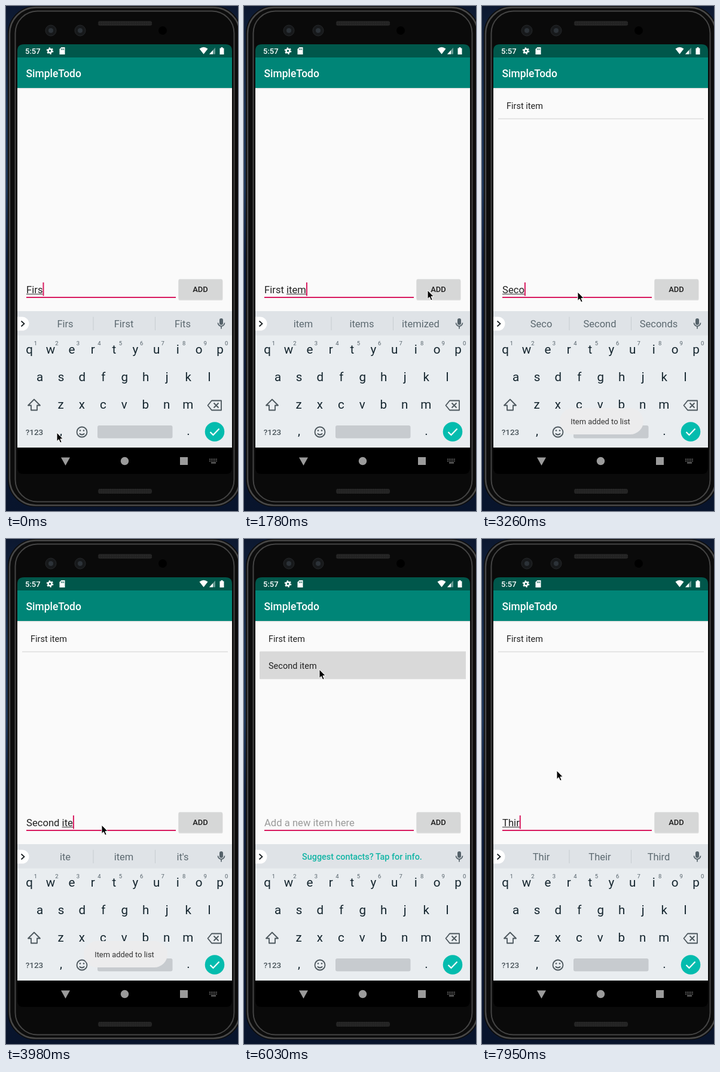
An HTML page for the animation above (8000 ms loop, 388 px wide and 844 px high).

```html
<!DOCTYPE html>
<html lang="en">
<head>
<meta charset="utf-8">
<title>Todo list on a phone</title>
<style>
html, body { margin: 0; width: 100%; height: 100%; overflow: hidden; background: #0b1b36; }
svg { display: block; position: absolute; left: 0; top: 0; }
text { font-family: Roboto, sans-serif; white-space: pre; }
.mid { text-anchor: middle; }
.med { font-weight: 500; }
.line { fill: none; stroke: #4b565c; stroke-width: 1.8; stroke-linejoin: round; }
#keys text { font-size: 20.6px; fill: #14252e; }
#keys .num { font-size: 9.5px; fill: #55626a; }
#picks text { font-size: 16.5px; fill: #5c6970; }
.item { font-size: 14.5px; fill: #212121; }
#entry, #hint { font-size: 16.65px; }
</style>
</head>
<body>
<svg width="388" height="844" viewBox="0 0 388 844">
  <defs>
    <linearGradient id="desk" x2="0" y2="1">
      <stop offset="0" stop-color="#0c1830"/>
      <stop offset=".2" stop-color="#1a3152"/>
      <stop offset=".36" stop-color="#1d3658"/>
      <stop offset=".5" stop-color="#0c1d3c"/>
      <stop offset="1" stop-color="#08142c"/>
    </linearGradient>
    <linearGradient id="shade" x2="0" y2="1">
      <stop offset="0" stop-color="#000" stop-opacity=".12"/>
      <stop offset="1" stop-color="#000" stop-opacity="0"/>
    </linearGradient>
    <pattern id="mesh" width="3" height="3" patternUnits="userSpaceOnUse">
      <path d="M0 0H3V3H0z" fill="#202020"/><path d="M0 0H1.5V1.5H0z" fill="#303030"/>
    </pattern>
  </defs>

  <!-- phone body -->
  <path d="M0 0H388V844H0z" fill="url(#desk)"/>
  <rect x="3" y="0" width="391" height="837" rx="46" fill="#0c0c0c"/>
  <rect x="6" y="2.500" width="385" height="832" rx="44" fill="none" stroke="#484848" stroke-width="2.500"/>
  <rect x="15.500" y="8.500" width="366" height="820" rx="37" fill="#0a0a0a" stroke="#444" stroke-width="2"/>
  <rect x="154" y="25" width="90" height="8" rx="3" fill="url(#mesh)"/>
  <rect x="154" y="807" width="90" height="8" rx="3" fill="url(#mesh)"/>
  <g fill="#17191b" stroke="#26282a">
    <circle cx="75" cy="41" r="9"/><circle cx="124" cy="41" r="9"/>
  </g>
  <g fill="#2c3238">
    <circle cx="75" cy="41" r="4"/><circle cx="124" cy="41" r="4"/>
  </g>
  <circle cx="262" cy="41" r="7" fill="#000"/>

  <!-- app -->
  <path d="M19 86V75Q19 64 30 64H367Q378 64 378 75V86z" fill="#00574b"/>
  <path d="M19 86H378V137H19z" fill="#008577"/>
  <path d="M19 137H378V510H19z" fill="#fafafa"/>
  <path d="M19 137H378V139.500H19z" fill="url(#shade)"/>
  <text x="32" y="80" font-size="13" class="med" fill="#fff">5:57</text>
  <g fill="#fff">
    <circle cx="73.5" cy="75" r="3" fill="none" stroke="#fff" stroke-width="2.6"/>
    <circle cx="73.5" cy="75" r="4.9" fill="none" stroke="#fff" stroke-width="1.8" stroke-dasharray="2.5 2.63"/>
    <path d="M92.500 69H98.500V81H89.500V72z"/>
    <path d="M323.500 71.500Q330.500 66 337.500 71.500L330.500 80.500z"/>
    <path d="M350 69.500V80.500H340z" opacity=".4"/>
    <path d="M346 74V80.500H340z"/>
    <path d="M357.500 70.500H359.500V69H362.500V70.500H364.500V81H357.500z"/>
  </g>
  <path d="M92.500 71V73.500M94.500 71V73.500M96.500 71V73.500" stroke="#00574b"/>
  <text x="33.500" y="119" font-size="17.450" class="med" fill="#fff">SimpleTodo</text>

  <g id="first">
    <path d="M27 188.500H371" stroke="#dcdcdc" stroke-width="1.5"/>
    <text class="item" x="41" y="172">First item</text>
  </g>
  <g id="second">
    <path d="M27 233.500H371" stroke="#dcdcdc" stroke-width="1.5"/>
    <path id="held" d="M26 188.500H371V234H26z" fill="#d9d9d9"/>
    <text class="item" x="41" y="217">Second item</text>
  </g>

  <text id="hint" x="34" y="479.500" fill="#9a9a9a">Add a new item here</text>
  <text id="entry" x="34" y="479.500" fill="#212121"></text>
  <rect id="under" y="481" height="1" fill="#333"/>
  <path d="M34 487H284" stroke="#d81b60" stroke-width="2"/>
  <rect id="caret" y="462" width="2" height="22.500" fill="#d81b60"/>
  <rect x="288.500" y="458" width="74" height="34" rx="2" fill="#000" opacity=".12"/>
  <rect id="add" x="288.500" y="456.500" width="73.500" height="33.500" rx="2"/>
  <text class="mid med" x="325" y="478" font-size="13" fill="#1d1d1d">ADD</text>

  <!-- keyboard -->
  <path d="M19 510H378V738H19z" fill="#e9edf0"/>
  <path d="M19 510H378V550.500H19z" fill="#dfe3e7"/>
  <path d="M19 519.500H27A11 11 0 0 1 27 542.500H19z" fill="#fff"/>
  <path d="M25.500 526.500L30.500 531L25.500 535.500" fill="none" stroke="#1c2326" stroke-width="1.8"/>
  <g id="picks">
    <path d="M146 519.500V542M249.500 519.500V542" stroke="#c6ccd0"/>
    <text class="mid" x="99" y="537"></text>
    <text class="mid" x="197" y="537"></text>
    <text class="mid" x="295.500" y="537"></text>
  </g>
  <text id="tip" class="mid med" x="197.500" y="536" font-size="14.4" fill="#12b5a5">Suggest contacts? Tap for info.</text>
  <rect x="357" y="522" width="6" height="11" rx="3" fill="#55626a"/>
  <path d="M354.500 529.500A5.500 5.500 0 0 0 365.500 529.500M360 535V539.500" fill="none" stroke="#55626a" stroke-width="1.7"/>
  <g id="keys"></g>
  <path class="line" d="M47 657.500L57 667.500H52V675.500H42V667.500H37z"/>
  <path class="line" d="M344 659.500H360V675.500H344L337.500 667.500zM347.500 663.500L355.500 671.500M355.500 663.500L347.500 671.500"/>
  <text class="mid med" x="47.500" y="717" font-size="13.5" fill="#4b565c">?123</text>
  <circle class="line" cx="127" cy="712" r="8.500"/>
  <path class="line" d="M122.800 714.500Q127 718.500 131.200 714.500"/>
  <g fill="#4b565c"><circle cx="124" cy="709.500" r="1.300"/><circle cx="130" cy="709.500" r="1.300"/></g>
  <rect x="153" y="701" width="125.500" height="21.500" rx="3" fill="#c7cbcf"/>
  <circle cx="349" cy="711.500" r="16.300" fill="#04bcae"/>
  <path d="M341.500 712L346.500 717L356.500 706.500" fill="none" stroke="#fff" stroke-width="2.2"/>

  <g id="toast">
    <rect x="130" y="672" width="140" height="44" rx="22" fill="#ececed"/>
    <text class="mid" x="198" y="699" font-size="12.900" fill="#333">Item added to list</text>
  </g>

  <!-- navigation bar -->
  <path d="M19 738H378V772Q378 782 368 782H29Q19 782 19 772z" fill="#000"/>
  <g fill="#9b9b9b">
    <path d="M92 754.500H107L99.500 768z"/>
    <circle cx="198.500" cy="760.500" r="6.700"/>
    <path d="M291 754H304V767H291z"/>
  </g>
  <g fill="none" stroke="#858585" stroke-width="1.600" stroke-dasharray="1.600 1.200">
    <path d="M340 757.500H354M340 760.500H354"/>
    <path d="M343 763.500H351" stroke-dasharray="none"/>
  </g>

  <path id="mouse" d="M0 0V14.500L3.300 11.500L5.700 17L8.200 16L5.900 10.600H10.300z" fill="#000" stroke="#fff" stroke-width="1"/>
</svg>
<script>
const LOOP = 8000;
const $ = id => document.getElementById(id);
const NS = 'http://www.w3.org/2000/svg';

// [start ms, typed text, suggestions]; no suggestions shows the tip
const typing = [
  [0, 'Firs', 'Firs First Fits'],
  [150, 'First', 'First Firstly Firsthand'],
  [300, 'First ', 'time of day'],
  [450, 'First i', 'i in is'],
  [600, 'First it', 'it item its'],
  [750, 'First ite', "ite item it's"],
  [1050, 'First item', 'item items itemized'],
  [1930, '', 'item items itemized'],
  [2080, '', ''],
  [2820, 'S', 'S So See'],
  [2960, 'Sec', 'Sec Second See'],
  [3260, 'Seco', 'Seco Second Seconds'],
  [3400, 'Secon', 'Secon Second Seconds'],
  [3550, 'Second', 'Second Seconds Secondary'],
  [3690, 'Second i', 'i in is'],
  [3840, 'Second it', 'it item its'],
  [3980, 'Second ite', "ite item it's"],
  [4130, 'Second item', 'item items itemized'],
  [5170, '', 'item items itemized'],
  [5320, '', ''],
  [7660, 'T', 'T The This'],
  [7800, 'Thi', 'Thi This Think'],
  [7950, 'Thir', 'Thir Their Third']
];
const pointer = [
  [0, 85, 713], [1200, 97, 694], [1350, 150, 630], [1490, 225, 550],
  [1640, 287, 490], [1780, 307, 475], [2220, 235, 477], [2370, 160, 478],
  [4580, 180, 478], [4730, 225, 478], [4880, 280, 478], [5020, 324, 478],
  [5320, 205, 325], [5460, 126, 218], [6770, 125, 387]
];
const toast = [
  [0, 0], [2080, .4], [2220, .85], [2370, 1], [4280, .5], [4430, 0],
  [5320, .4], [5460, .8], [5610, 1], [6030, 0]
];
const at = (steps, t) => steps.findLast(s => s[0] <= t);
const during = (t, ...spans) => spans.some(([a, b]) => t >= a && t < b);
const show = (id, on) => $(id).setAttribute('visibility', on ? 'visible' : 'hidden');

function label(s, x, y, cls = '') {
  const el = document.createElementNS(NS, 'text');
  el.setAttribute('class', 'mid ' + cls);
  el.setAttribute('x', x);
  el.setAttribute('y', y);
  el.textContent = s;
  $('keys').append(el);
}

[['qwertyuiop', 39, 580.5], ['asdfghjkl', 56.5, 627], ['zxcvbnm', 91.5, 673], [',', 92, 717], ['.', 305, 717]]
  .forEach(([row, x, y], r) => [...row].forEach((c, i) => {
    label(c, x + i * 35.45, y);
    if (!r) label((i + 1) % 10, x + 10.5 + i * 35.45, 566.5, 'num');
  }));

const slots = document.querySelectorAll('#picks text');
let last;

function type(step) {
  if (step === last) return;
  last = step;
  const [, text, picks] = step;
  const entry = $('entry');
  entry.textContent = text;
  const width = text ? entry.getComputedTextLength() : 0;
  const start = text.lastIndexOf(' ') + 1;
  const left = start ? entry.getSubStringLength(0, start) : 0;
  $('under').setAttribute('x', 34 + left);
  $('under').setAttribute('width', Math.max(0, width - left));
  $('caret').setAttribute('x', 34 + width);
  show('hint', !text);
  show('tip', !picks);
  show('picks', picks);
  picks.split(' ').forEach((w, i) => slots[i].textContent = w);
}

function draw(now) {
  const t = now % LOOP;
  type(at(typing, t));
  const [, x, y] = at(pointer, t);
  $('mouse').setAttribute('transform', `translate(${x} ${y})`);
  $('toast').setAttribute('opacity', at(toast, t)[1]);
  $('add').setAttribute('fill', during(t, [1930, 2080], [5170, 5320]) ? '#b3b4b4' : '#d6d7d7');
  show('caret', !during(t, [2370, 2820], [5760, 6320], [6770, 7370]));
  show('first', t >= 1930);
  show('second', during(t, [5170, 6320]));
  show('held', during(t, [6030, 6320]));
  requestAnimationFrame(draw);
}
draw(0);
</script>
</body>
</html>
```
